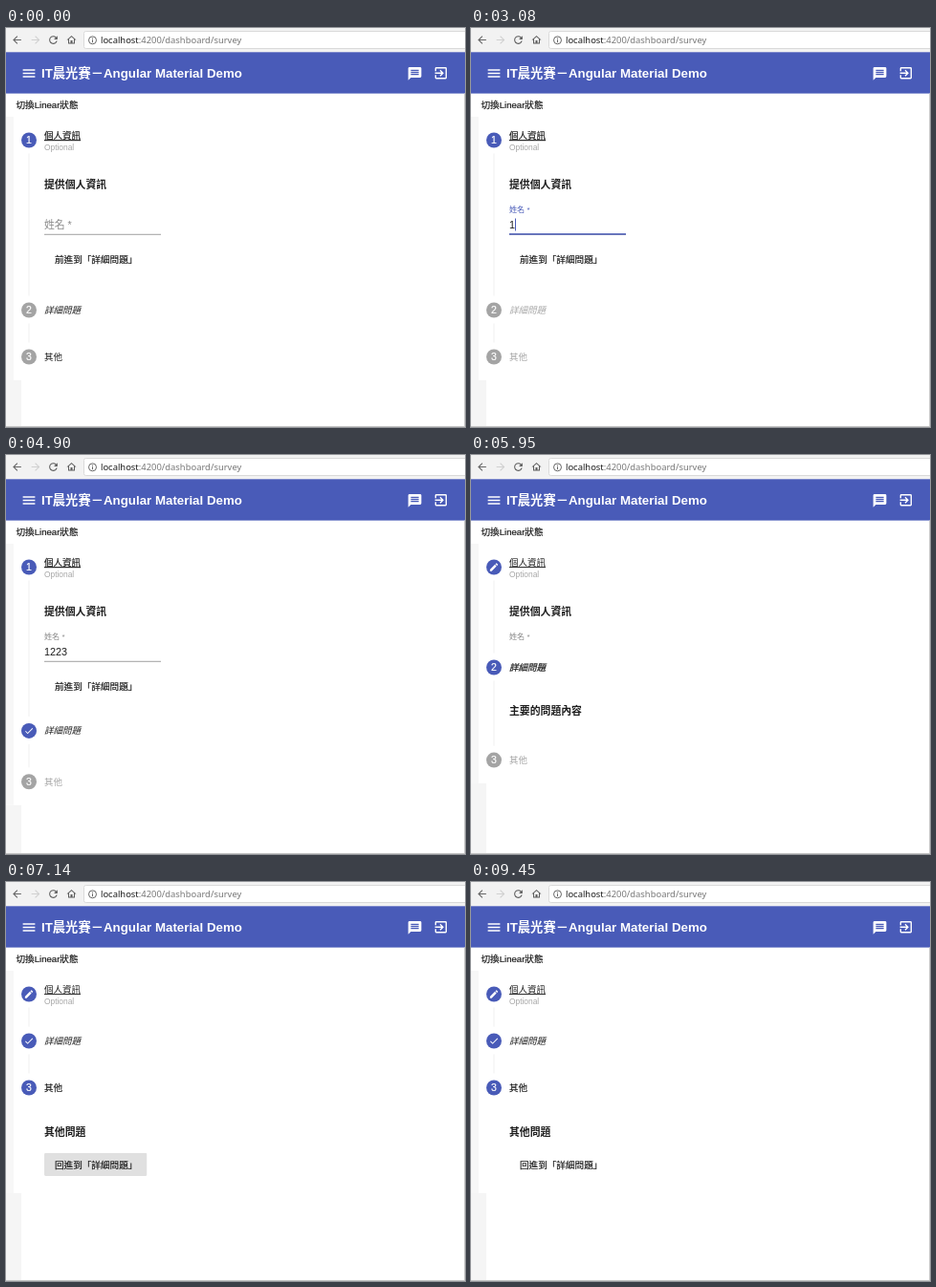
An HTML page for the animation above (9940 ms loop, 480x418 px).

```html
<!DOCTYPE html>
<html lang="zh-Hant">
<head>
<meta charset="utf-8">
<title>Stepper demo</title>
<style>
  html, body { margin: 0; width: 100%; height: 100%; overflow: hidden; background: #fff; }
  #stage { display: block; width: 480px; height: 418px; }
  text { font-family: "Liberation Sans", "Noto Sans CJK TC", "Noto Sans CJK", sans-serif; font-size: 9.6px; fill: #1c1c1c; }
  .url { font-family: "Noto Sans", sans-serif; font-size: 9.42px; fill: #777; }
  .url tspan { fill: #1a1a1a; }
  .title { font-size: 13.3px; font-weight: bold; fill: #fff; }
  .medium { font-weight: 500; stroke: #1c1c1c; stroke-width: .2px; }
  .heading { font-size: 10.85px; font-weight: bold; }
  .label { font-size: 9.5px; }
  .italic { font-style: italic; }
  .underline { text-decoration: underline; }
  .optional { font-size: 8.4px; fill: #a6a6a6; }
  .number { font-size: 10.5px; fill: #fff; stroke: #fff; stroke-width: .2px; text-anchor: middle; }
  .field { font-size: 10.8px; }
  .disabled { fill: #a6a6a6; stroke: none; }
</style>
</head>
<body>
<svg id="stage" viewBox="0 0 480 418" xmlns="http://www.w3.org/2000/svg"></svg>
<script>
const LOOP = 9940, TICK = 70;
const INDIGO = '#495bb8', GRAY = '#a4a4a4';
const TOP = 117.5, HEADER = 49, HALF = HEADER / 2;
const HEIGHTS = [129, 85, 86];
// [time, step that becomes selected]
const MOVES = [[0, 1], [3940, 2], [4737, 1], [5865, 2], [6650, 3]];
const LINEAR_ON = 1540, FOCUS = 2570, BLUR = 3850;
const KEY_TIMES = [3080, 3150, 3220, 3290];

const ICONS = {
  menu: 'M3 18h18v-2H3zM3 13h18v-2H3zM3 8h18V6H3z',
  chat: 'M20 2H4a2 2 0 0 0-2 2V22l4-4h14a2 2 0 0 0 2-2V4a2 2 0 0 0-2-2zM18 14H6v-2h12zM18 11H6V9h12zM18 8H6V6h12z',
  exit: 'M10.1 15.6L11.5 17l5-5-5-5-1.4 1.4L12.7 11H3v2h9.7zM19 3H5a2 2 0 0 0-2 2v4h2V5h14v14H5v-4H3v4a2 2 0 0 0 2 2h14a2 2 0 0 0 2-2V5a2 2 0 0 0-2-2z',
  edit: 'M3 17.2V21h3.8L17.8 9.9 14.1 6.2zM20.7 7a1 1 0 0 0 0-1.4L18.4 3.3a1 1 0 0 0-1.4 0L15.1 5.1 18.9 8.9z',
  done: 'M9 16.2L4.8 12l-1.4 1.4L9 19 21 7l-1.4-1.4z',
  back: 'M20 11H7.8l5.6-5.6L12 4l-8 8 8 8 1.4-1.4L7.8 13H20z',
  forward: 'M4 11h12.2l-5.6-5.6L12 4l8 8-8 8-1.4-1.4 5.6-5.6H4z',
  reload: 'M17.6 6.4A8 8 0 1 0 19.7 14h-2.1A6 6 0 1 1 12 6c1.7 0 3.1.7 4.2 1.8L13 11h7V4z',
  home: 'M12 3L2 12h3v8h14v-8h3zM12 5.7l5 4.5V18h-3v-5h-4v5H7v-7.8z'
};

const icon = (name, cx, cy, size, fill, attrs = '') =>
  `<path d="${ICONS[name]}" fill="${fill}" ${attrs}
    transform="translate(${cx - size / 2} ${cy - size / 2}) scale(${size / 24})"/>`;

const button = (id, x, y, width, label, inset = 11, baseline = 15.6) => `
  <svg id="${id}" x="${x}" y="${y}" width="${width}" height="24">
    <rect class="hover" width="${width}" height="24" rx="1.4" opacity="0"/>
    <circle class="ripple" cx="${width / 2}" cy="9" r="0" opacity="0"/>
    <text class="medium" x="${inset}" y="${baseline}">${label}</text>
  </svg>`;

const heading = label => `<text class="heading" x="40" y="50">${label}</text>`;

const step = (n, label, style, extra, body) => `
  <g id="step${n}">
    <rect class="line" x="23.5" y="14" width="1" height="0" fill="#efefef"/>
    <circle cx="24" r="8"/>
    <text class="number" x="24" y="3.8">${n}</text>
    ${n < 3 ? icon(n === 1 ? 'edit' : 'done', 24, 0, 11, '#fff', 'class="mark"') : ''}
    <text class="label ${style}" x="40" y="${extra ? -1.4 : 3.5}">${label}</text>${extra}
    <svg class="content" y="${HALF}" width="480" height="0"><g transform="translate(0 ${-HALF})">${body}</g></svg>
  </g>`;

const nameField = `
  <g id="hint"><text class="field" fill="#888">姓名 *</text></g>
  <text class="field" id="typed" x="40" y="92.5"></text>
  <rect id="caret" y="82" width="1" height="13" fill="${INDIGO}"/>
  <rect x="40" y="98.3" width="122" height="0.9" fill="#949494"/>
  <rect id="focusLine" y="97.7" height="1.5" fill="${INDIGO}"/>`;

const stage = document.getElementById('stage');
stage.innerHTML = `
  <rect width="480" height="418" fill="#fff"/>
  <rect id="margin" y="93" width="8" fill="#f7f7f7"/>
  <rect id="below" width="16" fill="#f5f5f5"/>
  <rect width="480" height="25.3" fill="#f2f2f2"/>
  <rect x="81.5" y="3.5" width="402" height="18" rx="2" fill="#fff" stroke="#dadada"/>
  ${icon('back', 11.5, 12.5, 13, '#666')}${icon('forward', 31, 12.5, 13, '#d0d0d0')}
  ${icon('reload', 49.5, 12.5, 13, '#5c5c5c')}${icon('home', 68.5, 12.5, 12, '#5c5c5c')}
  <circle cx="90.5" cy="12.8" r="4" fill="none" stroke="#666"/>
  <path d="M90.5 10.3v1.1M90.5 12.2v3" stroke="#666"/>
  <text class="url" x="99" y="16"><tspan>localhost</tspan>:4200/dashboard/survey</text>
  <rect y="25.3" width="480" height="43.3" fill="${INDIGO}"/>
  ${icon('menu', 24, 47.5, 17, '#fff')}
  <text class="title" x="37" y="52.4">IT晨光賽－Angular Material Demo</text>
  ${icon('chat', 427.5, 47.8, 16.5, '#fff')}${icon('exit', 454.8, 47.3, 16.5, '#fff')}
  ${button('toggle', 0, 69, 86, '切換Linear狀態', 10.5, 14.8)}
  ${step(1, '個人資訊', 'underline', '<text class="optional" x="40" y="10.3">Optional</text>',
    heading('提供個人資訊') + nameField + button('toDetails', 40, 112.5, 107.5, '前進到「詳細問題」'))}
  ${step(2, '詳細問題', 'italic', '',
    heading('主要的問題內容') + button('toPersonal', 40, 68.5, 107.5, '回進到「個人資訊」') +
    button('toOther', 150, 68.5, 89, '前進到「其他」'))}
  ${step(3, '其他', '', '', heading('其他問題') + button('backToDetails', 40, 68.5, 107.5, '回進到「詳細問題」'))}
  <rect x="479" y="68.6" width="1" height="349.4" fill="#cfcfcf"/>
  <rect y="417" width="480" height="1" fill="#c6c6c6"/>`;

const $ = id => document.getElementById(id);
const set = (el, attrs) => { for (const k in attrs) el.setAttribute(k, attrs[k]); };
const clamp = v => Math.min(1, Math.max(0, v));
const during = (t, from, to) => t >= from && t < to;

function bezier(x1, y1, x2, y2) {
  const at = (a, b, s) => 3 * (1 - s) ** 2 * s * a + 3 * (1 - s) * s * s * b + s ** 3;
  return x => {
    let lo = 0, hi = 1;
    for (let i = 0; i < 24; i++) {
      const mid = (lo + hi) / 2;
      if (at(x1, x2, mid) < x) lo = mid; else hi = mid;
    }
    return at(y1, y2, lo);
  };
}
const standard = bezier(.4, 0, .2, 1);
const decelerate = bezier(0, 0, .2, 1);
const swift = bezier(.25, .8, .25, 1);

function drawButton(id, t, hover, pressedAt) {
  const age = t - pressedAt;
  const fade = 1 - clamp((age - 450) / 250);
  set($(id).querySelector('.hover'), { opacity: .12 * hover });
  set($(id).querySelector('.ripple'), {
    r: 58 * decelerate(clamp(age / 450)),
    opacity: age >= 0 ? .1 * fade : 0
  });
}

function drawField(t) {
  const focused = during(t, FOCUS, BLUR);
  const float = swift(clamp((t - FOCUS) / 330));
  const typed = '1223'.slice(0, KEY_TIMES.filter(k => k <= t).length);
  const width = focused ? 122 * float : 0;
  set($('hint'), { transform: `translate(40 ${92.5 - 17 * float}) scale(${1 - .25 * float})` });
  $('hint').firstChild.style.fill = focused ? INDIGO : '#888';
  $('typed').textContent = typed;
  set($('caret'), { x: 40 + 6.01 * typed.length, opacity: focused && t < 3710 ? 1 : 0 });
  set($('focusLine'), { x: 101 - width / 2, width });
}

function drawSteps(t) {
  const current = MOVES.filter(m => m[0] <= t).length - 1;
  const [start, selected] = MOVES[current];
  const previous = current ? MOVES[current - 1][1] : 0;
  const progress = current ? standard(clamp((t - start) / 225)) : 1;
  const furthest = Math.max(...MOVES.slice(0, current + 1).map(m => m[1]));
  let y = TOP;
  HEIGHTS.forEach((full, i) => {
    const n = i + 1, el = $('step' + n);
    const open = n === selected ? progress : n === previous ? 1 - progress : 0;
    const height = full * open;
    const visited = n <= furthest, marked = visited && n !== selected;
    const label = el.querySelector('.label');
    set(el, { transform: `translate(0 ${y})` });
    set(el.querySelector('circle'), { fill: visited ? INDIGO : GRAY });
    set(el.querySelector('.number'), { opacity: marked ? 0 : 1 });
    if (n < 3) {
      set(el.querySelector('.mark'), { opacity: marked ? 1 : 0 });
      set(el.querySelector('.line'), { height: HEADER + height - 29 });
    }
    label.classList.toggle('medium', n === selected);
    label.classList.toggle('disabled', !visited && t >= LINEAR_ON);
    set(el.querySelector('.content'), { height, visibility: height > .1 ? 'visible' : 'hidden' });
    y += HEADER + height;
  });
  const end = y - HALF;
  set($('margin'), { height: end - 93 });
  set($('below'), { y: end, height: 418 - end });
}

function draw(t) {
  drawSteps(t);
  drawField(t);
  drawButton('toggle', t, during(t, 1050, 2100) ? 1 : 0, 1540);
  drawButton('toDetails', t, during(t, 3640, 4200) || during(t, 5530, 6100) ? 1 : 0, t < 5000 ? 3850 : 5810);
  drawButton('toPersonal', t, during(t, 4130, 4960) || during(t, 6090, 6230) ? 1 : 0, 4620);
  drawButton('toOther', t, during(t, 6440, 6930) ? 1 : 0, 6580);
  drawButton('backToDetails', t, t < 7140 ? 0 : 1 - clamp((t - 7910) / 1190), LOOP);
}

function frame() {
  const t = performance.now() % LOOP;
  draw(Math.floor(t / TICK) * TICK);
  requestAnimationFrame(frame);
}
frame();
</script>
</body>
</html>
```
